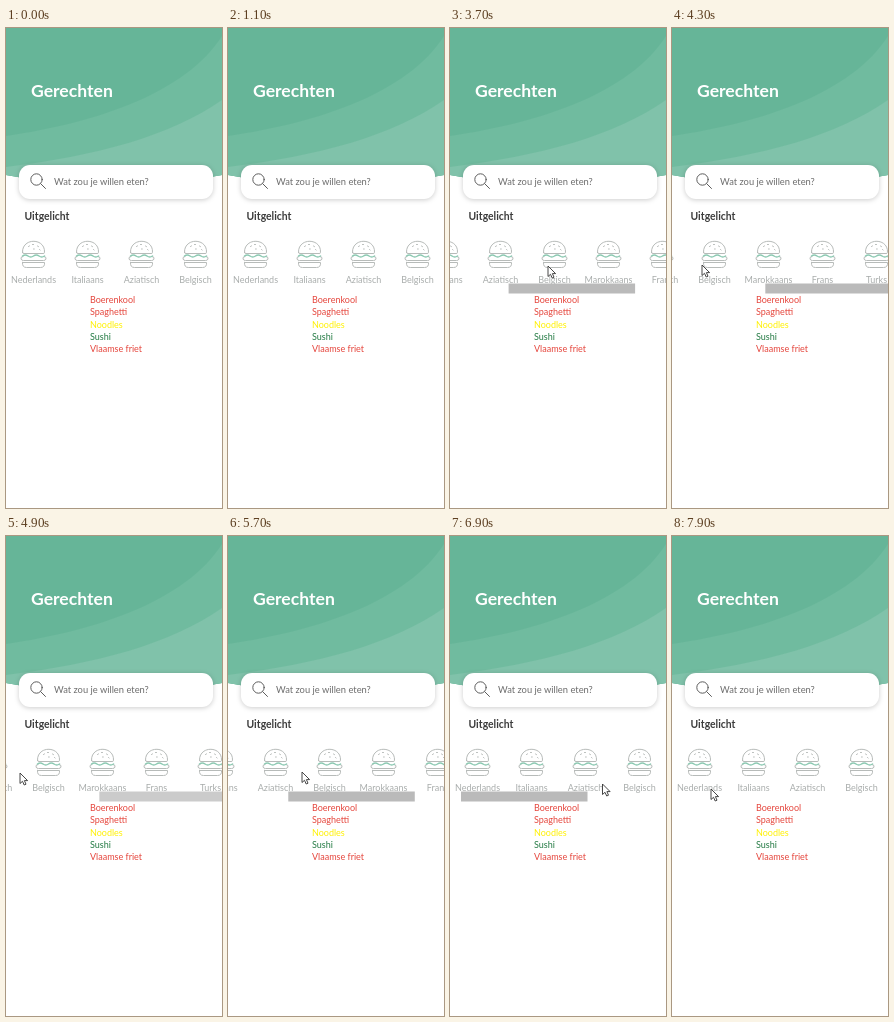
Write an HTML page that moves like this. It is 216 by 480 pixels and loops after 8000 ms.

```html
<!DOCTYPE html>
<html lang="nl">
<head>
<meta charset="utf-8">
<title>Gerechten</title>
<style>
  html, body { margin: 0; width: 100%; height: 100%; overflow: hidden; background: #fff; }
  svg { display: block; width: 100%; height: 100%; font: 9px Lato, sans-serif; }
  .title { font-size: 17.6px; font-weight: 700; fill: #fff; }
  .heading { font-size: 10.4px; font-weight: 700; fill: #3c3c3c; }
  .hint { font-size: 9.35px; fill: #6c6c6c; }
  .label { fill: #a9adac; text-anchor: middle; }
  .search { filter: drop-shadow(0 1px 2.5px rgba(0, 0, 0, .2)); }
  .line { fill: none; stroke: #b7bbb9; stroke-width: 1; stroke-linecap: round; stroke-linejoin: round; }
  .lettuce { stroke: #8cc9b2; stroke-width: 1.5; }
</style>
</head>
<body>
<svg viewBox="0 0 216 480" preserveAspectRatio="none">
  <defs>
    <clipPath id="header"><path d="M0 0H216V147Q108 168 0 147Z"/></clipPath>
    <g id="burger">
      <path class="line" d="M-11 224.5C-12 209.500 12 209.500 11 224.500Q11 225.500 9.500 225.500H-9.500Q-11 225.500 -11 224.500Z"/>
      <path class="line" d="M-5 218.500l1 -.6M-1 216.500h1M4 218l1 .6M0 221h.8M6 221.500l.6 .5"/>
      <path class="line" d="M-10.500 228.500Q-13 228.500 -12.500 231Q-12 232.500 -10 232.500H10Q12 232.500 12.500 231Q13 228.500 10.500 228.500"/>
      <path class="line lettuce" d="M-11 228q2.750 -2 5.500 0t5.500 0t5.500 0t5.500 0"/>
      <path class="line" d="M-11 234.500H11Q11.500 239.500 7 239.500H-7Q-11.500 239.500 -11 234.500Z"/>
    </g>
  </defs>

  <g clip-path="url(#header)">
    <path fill="#66b598" d="M0 0H216V170H0Z"/>
    <path fill="#70bb9f" d="M216 8C180 65 90 95 0 108V170H216Z"/>
    <path fill="#80c2aa" d="M216 72C165 108 90 128 0 139V170H216Z"/>
  </g>
  <text class="title" x="25" y="69">Gerechten</text>

  <rect class="search" x="13" y="137" width="194" height="34" rx="11" fill="#fff"/>
  <g fill="none" stroke="#5c5c5c" stroke-linecap="round">
    <circle cx="30.500" cy="151.500" r="5.700"/>
    <path d="M34.700 155.700L39.500 160.500"/>
  </g>
  <text class="hint" x="48" y="157.300">Wat zou je willen eten?</text>
  <text class="heading" x="18.500" y="192.300">Uitgelicht</text>

  <g id="strip"></g>
  <rect id="bar" y="255.500" width="126.500" height="10" fill="#bababa"/>
  <g id="dishes"></g>

  <path id="cursor" d="M0 0V10.500L2.500 8.300L4.200 12L6 11.200L4.400 7.600H7.600Z"
    fill="#fff" stroke="#333" stroke-width=".9" stroke-linejoin="round"/>
</svg>

<script>
  const LOOP = 8000, STEP = 200, OFFSET = 100;
  const byId = id => document.getElementById(id);
  const [strip, bar, dishes, cursor] = ['strip', 'bar', 'dishes', 'cursor'].map(byId);

  const kitchens = ['Nederlands', 'Italiaans', 'Aziatisch', 'Belgisch', 'Marokkaans', 'Frans', 'Turks'];
  strip.innerHTML = kitchens.map((name, i) =>
    `<g transform="translate(${27.5 + 54 * i})"><use href="#burger"/><text class="label" y="255">${name}</text></g>`
  ).join('');

  const menu = [
    ['Boerenkool', '#e5453c'], ['Spaghetti', '#e5453c'], ['Noodles', '#fff000'],
    ['Sushi', '#237a43'], ['Vlaamse friet', '#e5453c']
  ];
  dishes.innerHTML = menu.map(([name, color], i) =>
    `<text x="84" y="${274.8 + 12.35 * i}" fill="${color}">${name}</text>`
  ).join('');

  // Each key is [time, ...values]
  const pointer = [
    [2500, 62, 286], [2900, 168, 246], [3100, 183, 239], [3700, 98, 238], [4300, 30, 237],
    [4700, 14, 237], [5000, 14, 237], [5700, 74, 236], [6300, 133, 242],
    [6700, 163, 246], [7100, 142, 250], [7700, 42, 253], [7900, 39, 253]
  ];
  const scroll = [[3100, 0], [3700, 85], [4300, 147], [5000, 147], [5700, 88], [6300, 29], [6600, 0]];
  const barFade = [[3100, 0], [3300, 1], [4500, 1], [4900, .75], [5100, 1], [6900, 1], [7300, 0]];

  function at(keys, t) {
    const next = keys.findIndex(key => key[0] > t);
    if (next === 0) return keys[0].slice(1);
    if (next < 0) return keys[keys.length - 1].slice(1);
    const a = keys[next - 1], b = keys[next];
    const p = (t - a[0]) / (b[0] - a[0]);
    return a.slice(1).map((v, i) => v + (b[i + 1] - v) * p);
  }

  function draw(now) {
    const elapsed = now % LOOP;
    const t = Math.max(0, Math.floor((elapsed - OFFSET) / STEP) * STEP + OFFSET);
    const [shift] = at(scroll, t);
    const [x, y] = at(pointer, t);
    strip.setAttribute('transform', `translate(${-shift})`);
    bar.setAttribute('x', 11 + .56 * shift);
    bar.setAttribute('opacity', at(barFade, t)[0]);
    cursor.setAttribute('transform', `translate(${x} ${y})`);
    cursor.setAttribute('visibility', t < pointer[0][0] ? 'hidden' : 'visible');
  }

  const start = performance.now();
  function tick() {
    draw(performance.now() - start);
    requestAnimationFrame(tick);
  }
  tick();
</script>
</body>
</html>
```
